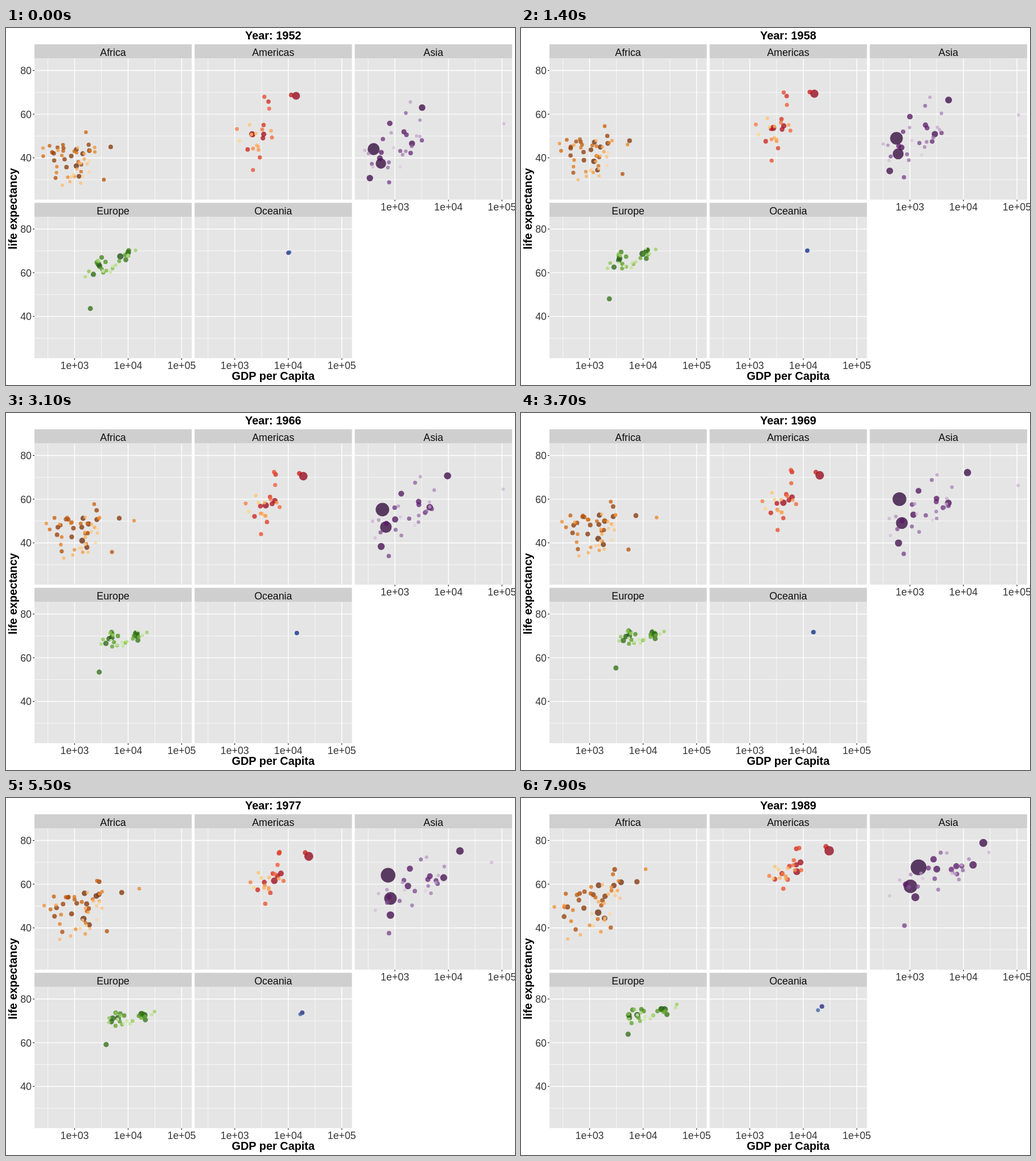
Recreate the animation shown at these times as an HTML page. Size 894 by 626 pixels, loop 8000 ms.

```html
<!DOCTYPE html>
<html lang="en">
<head>
<meta charset="utf-8">
<title>Life expectancy and GDP</title>
<style>
html, body { margin: 0; width: 100%; height: 100%; overflow: hidden; background: #fff; }
svg { display: block; width: 894px; height: 626px; font-family: "Liberation Sans", Arial, Helvetica, sans-serif; }
text { text-anchor: middle; font-size: 17.8px; }
.head { font-size: 19.9px; font-weight: bold; }
.strip { fill: #0d0d0d; }
.tick { fill: #363636; }
.left { text-anchor: end; }
.mark { stroke: #1f1f1f; stroke-width: 1.1; }
.major { stroke: #fff; stroke-width: 1.4; }
.minor { stroke: #fff; stroke-width: .7; }
circle { fill-opacity: .75; }
</style>
</head>
<body>
<svg viewBox="0 0 894 626">
  <text id="year" class="head" x="469.3" y="19.7"></text>
  <text class="head" x="469.3" y="617">GDP per Capita</text>
  <text class="head" transform="translate(18.5 317) rotate(-90)">life expectancy</text>
</svg>
<script>
const svg = document.querySelector('svg');
const yearLabel = document.getElementById('year');

const STEP = 100, FRAMES = 80, YEARS_PER_FRAME = 55 / 119;
const PANEL_W = 276.3, PANEL_H = 247.5;
const dots = [];

function draw(tag, attrs, text = '') {
  const el = document.createElementNS('http://www.w3.org/2000/svg', tag);
  for (const key in attrs) el.setAttribute(key, attrs[key]);
  el.textContent = text;
  return svg.appendChild(el);
}

const line = (cls, x1, y1, x2, y2) => draw('line', { class: cls, x1, y1, x2, y2 });
const label = (cls, x, y, text) => draw('text', { class: cls, x, y }, text);
const mix = (a, b, k) => a + (b - a) * k;

const xAt = logGdp => 120.5 + (logGdp - 3) * 94;
const yAt = life => 74.5 + (80 - life) * 3.83;
const radius = millions => .35 + 1.2 * (2 + 10 * Math.sqrt(millions / 1318));

// Blends rows of numbers that are evenly spaced over the loop.
function along(rows, k) {
  const pos = k * (rows.length - 1);
  const i = Math.min(Math.floor(pos), rows.length - 2);
  return rows[i].map((v, j) => mix(v, rows[i + 1][j], pos - i));
}

// Palette colour at k, darkened by a display gamma.
function ramp(palette, k) {
  const rgb = palette.split(' ').map(hex => [0, 2, 4].map(n => parseInt(hex.substr(n, 2), 16)));
  return `rgb(${along(rgb, k).map(c => Math.round(255 * (c / 255) ** 1.3))})`;
}

function seeded(seed) {
  return () => {
    seed = seed + 0x6d2b79f5 | 0;
    let t = Math.imul(seed ^ seed >>> 15, 1 | seed);
    t = t + Math.imul(t ^ t >>> 7, 61 | t) ^ t;
    return ((t ^ t >>> 14) >>> 0) / 4294967296;
  };
}

function panel(name, col, row) {
  const dx = col * 281.3, dy = row * 278;
  const left = 50 + dx, right = left + PANEL_W, top = 53.5 + dy, bottom = top + PANEL_H;
  draw('rect', { x: left, y: top - 25, width: PANEL_W, height: 25, fill: '#cfcfcf' });
  draw('rect', { x: left, y: top, width: PANEL_W, height: PANEL_H, fill: '#e5e5e5' });
  label('strip', left + 138, top - 5, name);

  for (const v of [2.5, 3.5, 4.5]) line('minor', xAt(v) + dx, top, xAt(v) + dx, bottom);
  for (const v of [30, 50, 70]) line('minor', left, yAt(v) + dy, right, yAt(v) + dy);
  for (const v of [3, 4, 5]) {
    const x = xAt(v) + dx;
    line('major', x, top, x, bottom);
    if (row || col === 2) {
      line('mark', x, bottom, x, bottom + 3);
      label('tick', x, bottom + 18.6, `1e+0${v}`);
    }
  }
  for (const v of [40, 60, 80]) {
    const y = yAt(v) + dy;
    line('major', left, y, right, y);
    if (!col) {
      line('mark', left - 3, y, left, y);
      label('tick left', left - 5, y + 6.5, v);
    }
  }
  return { dx, dy };
}

// A country that follows its own key points of GDP and life expectancy.
function lead(pop, ...points) {
  const rows = points.map(([gdp, life]) => [Math.log10(gdp), life]);
  return { pop, place: k => along(rows, k) };
}

// Countries scattered around a trend, whose rows hold
// mean log GDP, its spread, mean life expectancy, its spread, correlation.
function cloud(count, seed, biggest, smallest, trend) {
  const random = seeded(seed);
  const normal = () => 2 * (random() + random() + random() - 1.5);
  return Array.from({ length: count }, (_, i) => {
    const u0 = normal(), v0 = normal(), du = .4 * normal(), dv = .4 * normal();
    const place = k => {
      const [x, sx, y, sy, corr] = along(trend, k);
      const u = u0 + du * (k - .5), v = v0 + dv * (k - .5);
      return [x + sx * u, y + sy * (corr * u + Math.sqrt(1 - corr * corr) * v)];
    };
    return { pop: biggest * (smallest / biggest) ** (i / (count - 1)), place };
  });
}

// Larger countries get the darker end of the palette.
function populate({ dx, dy }, growth, palette, countries) {
  countries.sort((a, b) => b.pop - a.pop).forEach(({ pop, place }, i) => {
    const el = draw('circle', { fill: ramp(palette, i / (countries.length - 1)) });
    dots.push({ el, dx, dy, place, r0: radius(pop), r1: radius(pop * growth) });
  });
}

populate(panel('Africa', 0, 0), 2.5, '7f3b08 b35806 e08214 fdb863 fee0b6', [
  lead(33, [1077, 36.3], [1480, 42.3], [1445, 47]),
  lead(22, [1419, 41.9], [1950, 50.5], [3860, 60.9]),
  lead(14, [4725, 45], [7550, 53], [7660, 61.1]),
  lead(4, [3521, 30], [5480, 37.4], [2483, 40.1]),
  lead(1, [2388, 42.7], [20500, 52.2], [11147, 66.9]),
  ...cloud(47, 11, 20, .1, [
    [2.92, .27, 39, 5.2, .3], [3.1, .31, 47.5, 5.8, .45], [3.1, .37, 52.5, 7.5, .65]
  ])
]);

populate(panel('Americas', 1, 0), 1.8, 'a50026 d73027 f46d43 fdae61 fee090', [
  lead(158, [13990, 68.4], [20800, 71.1], [30450, 75.3]),
  lead(57, [2109, 50.9], [4450, 58.9], [7565, 65.7]),
  lead(30, [3478, 50.8], [6400, 61.6], [8895, 70]),
  lead(15, [11367, 68.8], [17700, 72.6], [26550, 77.2]),
  ...cloud(21, 5, 18, .7, [
    [3.5, .2, 52.5, 9, .45], [3.67, .21, 61.5, 7.5, .5], [3.74, .22, 68, 5.5, .65]
  ])
]);

populate(panel('Asia', 2, 0), 2.05, '40004b 762a83 9970ab c2a5cf e7d4e8', [
  lead(556, [400, 44], [585, 50.3], [490, 44.8], [620, 58.8],
    [685, 63.2], [755, 64.2], [1000, 65.7], [1450, 67.7]),
  lead(372, [547, 37.4], [719, 49.9], [1025, 59]),
  lead(82, [3217, 63], [13000, 72.8], [23500, 78.9]),
  lead(8, [779, 28.8], [765, 35.4], [791, 41]),
  lead(.2, [108382, 55.6], [105000, 67], [29800, 74.5]),
  ...cloud(28, 23, 80, .1, [
    [3.12, .34, 46.5, 8.5, .55], [3.4, .42, 57, 8.5, .7], [3.65, .5, 66, 6.5, .75]
  ])
]);

populate(panel('Europe', 0, 1), 1.2, '276419 4d9221 7fbc41 b8e186 e6f5d0', [
  lead(69, [7144, 67.5], [17300, 70.9], [25130, 75.2]),
  lead(50, [9980, 69.2], [15400, 71.8], [21940, 75.4]),
  lead(26, [1969, 43.6], [3200, 56.1], [5243, 63.9]),
  ...cloud(27, 8, 48, .2, [
    [3.68, .27, 65.3, 4.5, .85], [3.96, .24, 70.6, 2.2, .55], [4.1, .26, 74, 2.6, .7]
  ])
]);

populate(panel('Oceania', 1, 1), 1.8, '313695 4575b4', [
  lead(8.7, [10040, 69.1], [16000, 71.9], [22300, 76.6]),
  lead(2, [10557, 69.4], [15500, 71.8], [18830, 74.9])
]);

let shown = -1;

function render() {
  const frame = Math.floor(performance.now() / STEP) % FRAMES;
  if (frame !== shown) {
    shown = frame;
    yearLabel.textContent = `Year: ${Math.round(1952 + frame * YEARS_PER_FRAME)}`;
    const k = frame / (FRAMES - 1);
    for (const { el, dx, dy, place, r0, r1 } of dots) {
      const [logGdp, life] = place(k);
      el.setAttribute('cx', (xAt(logGdp) + dx).toFixed(2));
      el.setAttribute('cy', (yAt(life) + dy).toFixed(2));
      el.setAttribute('r', mix(r0, r1, k).toFixed(2));
    }
  }
  requestAnimationFrame(render);
}
render();
</script>
</body>
</html>
```
